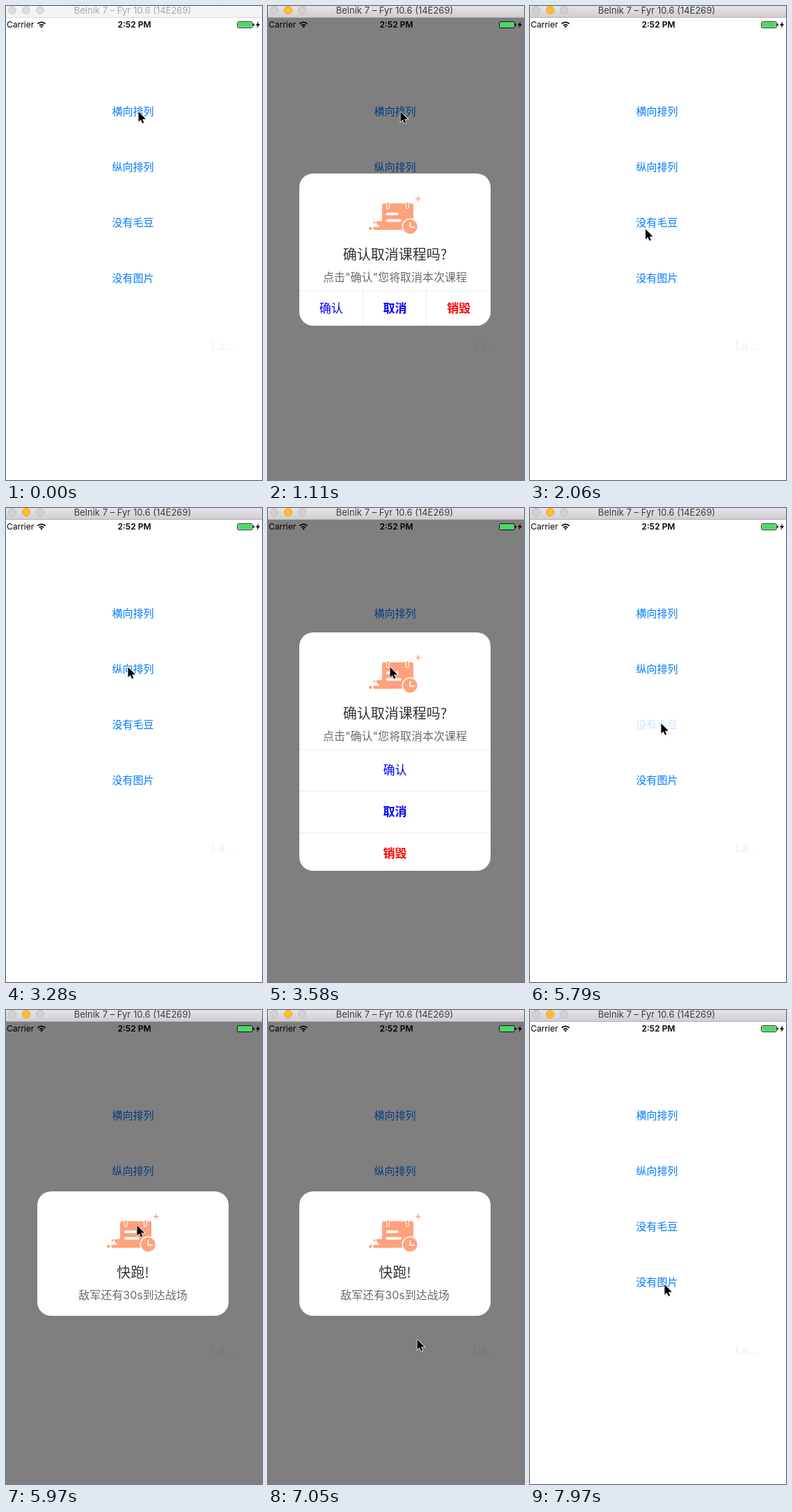
Recreate the animation shown at these times as an HTML page with a canvas. Size 368 by 682 pixels, loop 8 s.

```html
<!DOCTYPE html>
<html lang="zh">
<head>
<meta charset="utf-8">
<style>
html, body { margin: 0; width: 100%; height: 100%; overflow: hidden; background: #fff; }
canvas { display: block; width: 368px; height: 682px; }
</style>
</head>
<body>
<canvas id="stage" width="368" height="682"></canvas>
<script>
const ctx = document.getElementById('stage').getContext('2d');
const W = 368, H = 682, LOOP = 8000, CX = 182.5;
const LATIN = 'Inter, "Noto Sans CJK SC", "Noto Sans CJK", sans-serif';
const CJK = '"Noto Sans CJK SC", "Noto Sans CJK", sans-serif';
const ORANGE = '#ffa27c';

// Cursor path: time, x, y
const PATH = [
  [0, 190, 152], [1150, 190, 152], [1500, 183, 432], [1780, 183, 432],
  [2300, 152, 234], [2580, 186, 167], [2840, 186, 167], [3280, 175, 229],
  [3940, 175, 229], [4660, 200, 432], [4950, 200, 432], [5350, 208, 350],
  [5650, 190, 298], [5790, 188, 310], [6330, 188, 310], [7050, 214, 474],
  [7530, 214, 474], [7970, 193, 395], [LOOP, 193, 395]
];

const MENU = ['横向排列', '纵向排列', '没有毛豆', '没有图片'];
const PRESSES = [[500, 650, 0], [5790, 5970, 2]];

const CANCEL = { title: '确认取消课程吗?', note: '点击"确认"您将取消本次课程' };
const RUN = { title: '快跑!', note: '敌军还有30s到达战场' };
const ALERTS = [
  { from: 650, to: 1680, fadeIn: 300, fadeOut: 220, top: 241, bottom: 460, layout: 'row', ...CANCEL },
  { from: 3580, to: 4840, fadeIn: 0, fadeOut: 0, top: 179, bottom: 522, layout: 'column', ...CANCEL },
  { from: 5970, to: 7290, fadeIn: 0, fadeOut: 0, top: 261, bottom: 440, layout: 'none', ...RUN }
];
const ACTIONS = [['确认', '#0000ff', 400], ['取消', '#0000ff', 700], ['销毁', '#ff0000', 700]];

const clamp = v => Math.max(0, Math.min(1, v));
const ease = v => v * v * (3 - 2 * v);

function text(str, x, y, size, color, weight = 400, align = 'center', family = LATIN) {
  ctx.font = `${weight} ${size}px ${family}`;
  ctx.fillStyle = color;
  ctx.textAlign = align;
  ctx.textBaseline = 'alphabetic';
  ctx.fillText(str, x, y + size * 0.37);
}

function rect(x, y, w, h, color) {
  ctx.fillStyle = color;
  ctx.fillRect(x, y, w, h);
}

function pill(x, y, w, h, r, color) {
  ctx.beginPath();
  ctx.roundRect(x, y, w, h, r);
  ctx.fillStyle = color;
  ctx.fill();
}

function disc(x, y, r, color, edge) {
  ctx.beginPath();
  ctx.arc(x, y, r, 0, Math.PI * 2);
  ctx.fillStyle = color;
  ctx.fill();
  if (edge) {
    ctx.strokeStyle = edge;
    ctx.lineWidth = 1;
    ctx.stroke();
  }
}

function poly(points, color) {
  ctx.beginPath();
  points.forEach(([x, y]) => ctx.lineTo(x, y));
  ctx.closePath();
  ctx.fillStyle = color;
  ctx.fill();
}

function line(points, color, width) {
  ctx.beginPath();
  points.forEach(([x, y]) => ctx.lineTo(x, y));
  ctx.strokeStyle = color;
  ctx.lineWidth = width;
  ctx.stroke();
}

function titleBar(active) {
  const fill = ctx.createLinearGradient(0, 0, 0, 16);
  fill.addColorStop(0, active ? '#e6e4e6' : '#f6f6f6');
  fill.addColorStop(1, active ? '#d0ced0' : '#f4f4f4');
  rect(0, 0, W, 16, fill);
  rect(0, 16, W, 1, active ? '#b4b2b4' : '#dadada');
  [9, 29, 49].forEach((x, i) => {
    if (!active) disc(x, 6, 5.6, '#dcdcdc', '#d2d2d2');
    else if (i === 1) disc(x, 6, 5.6, '#ffbd2e', '#e5a62c');
    else disc(x, 6, 5.6, '#d2d0d2', '#bfbdbf');
  });
  text('Belnik 7 – Fyr 10.6 (14E269)', 182, 6.5, 13, active ? '#3c3c3c' : '#a9a9a9');
}

function statusBar() {
  text('Carrier', 1, 27, 12, '#000', 400, 'left');
  text('2:52 PM', 184.5, 27, 12, '#000', 600);

  const a = Math.PI * 0.25;
  [4.4, 7.8].forEach(r => {
    ctx.beginPath();
    ctx.arc(51, 31.2, r, -Math.PI / 2 - a, -Math.PI / 2 + a);
    ctx.strokeStyle = '#000';
    ctx.lineWidth = 1.8;
    ctx.stroke();
  });
  ctx.beginPath();
  ctx.moveTo(51, 31.5);
  ctx.arc(51, 31.5, 2.6, -Math.PI / 2 - a, -Math.PI / 2 + a);
  ctx.fillStyle = '#000';
  ctx.fill();

  ctx.beginPath();
  ctx.roundRect(332.5, 22.5, 22, 9, 2);
  ctx.strokeStyle = '#000';
  ctx.lineWidth = 0.8;
  ctx.stroke();
  pill(333.3, 23.3, 20.4, 7.4, 1, '#4cd964');
  pill(355.3, 25.2, 1.6, 3.6, 0.8, '#000');
  poly([[363.5, 22], [359, 27.7], [361.7, 27.7], [360.5, 32], [365.2, 26.1], [362.4, 26.1]], '#000');
}

function menu(t) {
  MENU.forEach((label, i) => {
    const down = PRESSES.some(([a, b, n]) => n === i && t >= a && t < b);
    ctx.globalAlpha = down ? 0.2 : 1;
    text(label, CX, 151 + i * 80, 15, '#007aff');
  });
  ctx.globalAlpha = 1;
  text('La...', 295, 489, 17, '#f0f0f0', 400, 'left');
}

// Calendar with clock, placed relative to the alert's top edge
function icon(top) {
  ctx.save();
  ctx.translate(0, top);
  line([[212, 36.3], [219.5, 36.3]], ORANGE, 1.5);
  line([[215.7, 32.5], [215.7, 40]], ORANGE, 1.5);

  pill(164, 43, 45, 38, 2.5, ORANGE);
  [172.3, 200.3].forEach(x => {
    pill(x - 2.4, 40.5, 4.8, 10.5, 2, '#fff');
    pill(x - 1.4, 41.5, 2.8, 8.5, 1.4, ORANGE);
  });
  pill(170, 56.3, 17, 3.6, 0.8, '#fff');
  pill(170, 65.8, 21.5, 3.6, 0.8, '#fff');

  disc(153, 70.5, 1.4, ORANGE);
  pill(155.5, 68.6, 12, 4, 2, ORANGE);
  pill(157, 71, 9, 8, 0, ORANGE);
  pill(152, 74.3, 8, 2.6, 1.3, '#fff');
  pill(151, 76.8, 30, 4.4, 2.2, ORANGE);
  disc(147.2, 79, 2.2, ORANGE);

  disc(204.3, 76.3, 11.8, '#fff');
  disc(204.3, 76.3, 10.4, ORANGE);
  line([[204.3, 70.3], [204.3, 77.3], [211, 77.3]], '#fff', 1.7);
  ctx.restore();
}

function actions(box) {
  const edge = '#ececec', y = box.top + 168.5;
  if (box.layout === 'row') {
    const w = 275 / 3;
    rect(45, y, 275, 1, edge);
    ACTIONS.forEach(([label, color, weight], i) => {
      if (i) rect(Math.round(45 + i * w) - 1, y, 1, box.bottom - y, edge);
      text(label, 45 + (i + 0.5) * w, box.top + 194, 17, color, weight, 'center', CJK);
    });
  } else if (box.layout === 'column') {
    ACTIONS.forEach(([label, color, weight], i) => {
      rect(45, Math.floor(y) + i * 60, 275, 1, edge);
      text(label, CX, box.top + 198 + i * 60, 17, color, weight, 'center', CJK);
    });
  }
}

function alertBox(box, t) {
  const shown = box.fadeIn ? clamp((t - box.from) / box.fadeIn) : 1;
  const left = box.fadeOut ? clamp((t - box.to) / box.fadeOut) : 0;
  ctx.save();
  ctx.globalAlpha = ease(shown) * (1 - ease(left));
  rect(0, 17, W, H - 17, 'rgba(0,0,0,0.5)');
  pill(45, box.top, 275, box.bottom - box.top, 20, '#fff');
  icon(box.top);
  text(box.title, CX, box.top + 117, 20, '#333', 400, 'center', CJK);
  text(box.note, CX, box.top + 149, 16, '#6a6a6a');
  actions(box);
  ctx.restore();
}

function cursor(t) {
  const i = Math.max(1, PATH.findIndex(p => p[0] > t));
  const [t0, x0, y0] = PATH[i - 1], [t1, x1, y1] = PATH[i];
  const k = ease(clamp((t - t0) / (t1 - t0)));
  ctx.save();
  ctx.translate(x0 + (x1 - x0) * k, y0 + (y1 - y0) * k);
  const arrow = [[0.5, 0], [0.5, 14.6], [3.8, 11.5], [6.1, 16.7], [8.3, 15.8], [6.1, 10.7], [10.8, 10.5]];
  ctx.shadowColor = 'rgba(0,0,0,0.35)';
  ctx.shadowBlur = 2;
  ctx.shadowOffsetY = 1;
  poly(arrow, '#fff');
  ctx.shadowColor = 'transparent';
  line([...arrow, arrow[0]], '#fff', 1.5);
  poly(arrow, '#000');
  ctx.restore();
}

function draw(t) {
  rect(0, 0, W, H, '#fff');
  menu(t);
  const box = ALERTS.find(b => t >= b.from && t < b.to + b.fadeOut);
  if (box) alertBox(box, t);
  statusBar();
  titleBar(t >= 500);
  cursor(t);
}

const start = performance.now();
function tick() {
  draw((performance.now() - start) % LOOP);
  requestAnimationFrame(tick);
}
tick();
</script>
</body>
</html>
```
